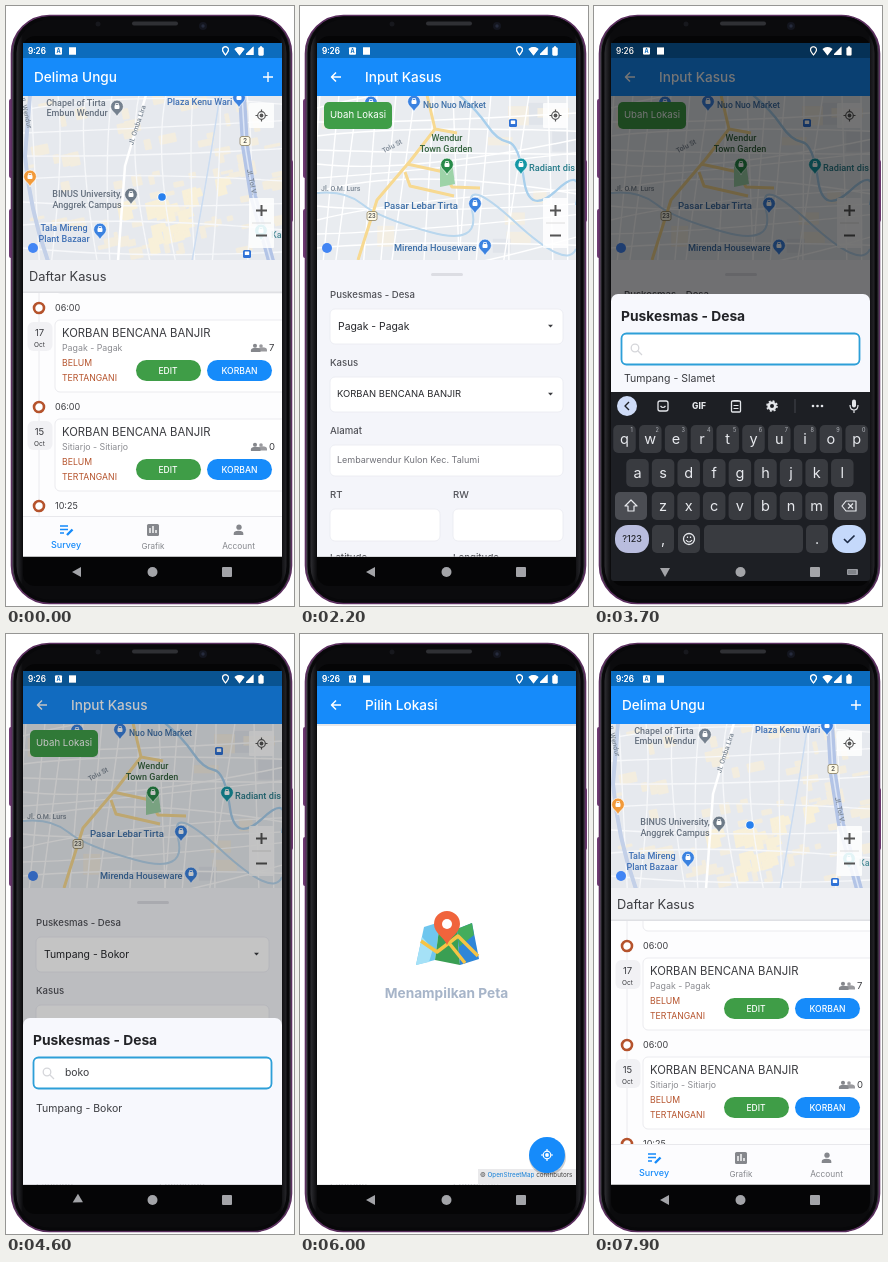
An HTML page that plays this animation: 288x600 px, repeating every 8000 ms.

```html
<!DOCTYPE html>
<html lang="id">
<head>
<meta charset="utf-8">
<title>Survey app demo</title>
<style>
html, body { margin: 0; width: 100%; height: 100%; overflow: hidden; background: #fff; }
svg { display: block; width: 288px; height: 600px; font-family: Inter, "Open Sans", sans-serif; }
.map text { font-family: Roboto, Inter, sans-serif; font-weight: 500; }
</style>
</head>
<body>
<svg id="stage" viewBox="0 0 288 600"></svg>
<script>
const BLUE = '#168bfa', GREEN = '#3f9d47', RUST = '#b5532c', GREY = '#85878c', INK = '#3b3c40';

// drawing helpers
const rect = (x, y, w, h, fill, r = 0, extra = '') =>
  `<rect x="${x}" y="${y}" width="${w}" height="${h}" rx="${r}" fill="${fill}" ${extra}/>`;
const circle = (x, y, r, fill, extra = '') => `<circle cx="${x}" cy="${y}" r="${r}" fill="${fill}" ${extra}/>`;
const line = (d, color, w = 1, extra = '') =>
  `<path d="${d}" fill="none" stroke="${color}" stroke-width="${w}" stroke-linejoin="round" ${extra}/>`;
const shape = (d, fill, extra = '') => `<path d="${d}" fill="${fill}" ${extra}/>`;
const at = (x, y, body) => `<g transform="translate(${x} ${y})">${body}</g>`;
const group = (id, body, extra = '') => `<g id="${id}" ${extra}>${body}</g>`;
// y is the vertical middle of the capitals
const text = (x, y, s, size, fill = INK, weight = 400, anchor = 'start', extra = '') =>
  `<text x="${x}" y="${y + size * 0.36}" font-size="${size}" fill="${fill}" font-weight="${weight}" text-anchor="${anchor}" ${extra}>${s}</text>`;
const mid = (x, y, s, size, fill, weight) => text(x, y, s, size, fill, weight, 'middle');
const tilted = (x, y, angle, s, size = 7) =>
  text(x, y, s, size, '#7b8794', 400, 'middle', `transform="rotate(${angle} ${x} ${y})"`);

let seed = 11;
const rnd = (a, b) => {
  seed = (seed * 16807) % 2147483647;
  return a + (b - a) * seed / 2147483647;
};

// icons
const arrow = (x, y) => line(`M${x + 5} ${y}H${x - 4.5}m4.5 -4.5l-4.5 4.5l4.5 4.5`, '#fff', 1.5);
const target = (x, y, c) => circle(x, y, 3.8, 'none', `stroke="${c}" stroke-width="1.2"`) + circle(x, y, 1.9, c) +
  line(`M${x} ${y - 6}v2.4m0 7.2v2.4M${x - 6} ${y}h2.4m7.2 0h2.4`, c, 1.2);
const pin = (x, y, c) => at(x, y,
  shape('M0 9C-1 5 -6.4 3 -6.4 -1.5A6.4 6.4 0 0 1 6.4 -1.5C6.4 3 1 5 0 9Z', c, 'stroke="#fff" stroke-width=".7"') +
  rect(-2.5, -3, 5, 4, '#fff', 1) + line('M-1.4 -3v-1.5h2.8v1.5', '#fff', .8));
const person = (x, y, s, c) => circle(x, y - 2.6 * s, 2.4 * s, c) +
  shape(`M${x - 4.8 * s} ${y + 4.6 * s}v-1.4q0 -2.8 4.8 -2.8t4.8 2.8v1.4z`, c);
const zoomBox = rect(243, 97, 25, 25, '#fff', 1, 'opacity=".85"') + target(255.5, 109.5, '#555') +
  rect(243, 192, 25, 50, '#fff', 1, 'opacity=".85"') + line('M246 217h19', '#ddd') +
  line('M250 204.500h11m-5.500 -5.500v11M250 229.500h11', '#555', 2);
const transit = (x, y) => rect(x - 4, y - 4, 8, 8, '#2f72d6', 1.5) + rect(x - 2.2, y - 2.5, 4.4, 3.4, '#fff', .5);
const badge = (x, y, s) => rect(x - 5, y - 4.500, 10, 9, '#fffbe8', 2, 'stroke="#80724b" stroke-width=".7"') + mid(x, y, s, 6.5, '#555');

const bar = (title, x) => rect(17, 37, 259, 53, BLUE) + rect(17, 37, 259, 15, '#0c6cbd') + text(x, 71, title, 13.6, '#fff', 500);
const status = () => text(22, 45, '9:26', 8.4, '#fff') + rect(49, 41.500, 7, 7, '#fff', 1) + mid(52.5, 45, 'A', 5.5, '#0c6cbd', 700) +
  rect(63, 41.500, 7, 7, '#fff') +
  line('M219.500 49q-3 -3.500 -3 -5.200a3 3 0 0 1 6 0q0 1.700 -3 5.200z', '#fff', 1.1) +
  shape('M228.500 43q5 -4 10 0l-5 6.500z M240 49v-1l7.500 -7.500v8.500z', '#fff') +
  rect(252.500, 41.500, 5, 8, '#fff', 1) + rect(254, 40.500, 2, 2, '#fff');

// home map
function homeMap() {
  let s = rect(17, 89, 259, 166, '#e6e9ee');
  for (let i = 0; i < 75; i++) {
    const x = rnd(20, 268), y = rnd(90, 246), w = rnd(4, 18), h = rnd(3, 14);
    s += rect(x, y, w, h, '#f3eddf', 1, `transform="rotate(-12 ${x} ${y})"`);
  }
  for (let i = 0; i < 14; i++) {
    const x = rnd(100, 215), y = rnd(165, 235);
    s += shape(`M${x} ${y}l14 -4l3 8l-6 2l2 8l-10 3z`, '#f8f0d9');
  }
  for (let i = 0; i < 9; i++) s += line(`M${25 + i * 27} 89q${rnd(-14, 10)} 60 ${rnd(-8, 14)} 166`, '#f7f8fa', 1.3);
  for (let i = 0; i < 7; i++) s += line(`M17 ${104 + i * 23}q110 ${rnd(-22, 12)} 259 ${rnd(-14, 10)}`, '#f7f8fa', 1.3);
  s += line('M24 89L19 150Q24 205 42 255', '#c3d0e8', 4) + line('M140 89L119 160L112 255', '#fff', 2.5);
  s += line('M236 89L239 140L247 190L265 255', '#b3c4e6', 8) + line('M236 89L239 140L247 190L265 255', '#dde6f6', 1.5);
  s += line('M214 89Q205 150 186 255', '#cbdcf1', 1.5);
  s += tilted(20, 106, 76, 'Jl. Wendur') + tilted(131, 119, -72, 'Jl. Omba Lira') + tilted(246, 176, 78, 'Jl. Tol V.');
  s += badge(239, 135, '2') + transit(241, 248);
  s += mid(70, 97, 'Chapel of Tirta', 9, '#66717f') + mid(71, 107, 'Embun Wendur', 9, '#66717f') + pin(111, 102, '#75818f');
  s += text(161, 96, 'Plaza Kenu Wari', 9, '#4071b5') + pin(233, 93, '#3b82e0');
  s += mid(81, 188, 'BINUS University,', 9, '#66717f') + mid(81, 199, 'Anggrek Campus', 9, '#66717f') + pin(125, 190, '#6d7a88');
  s += mid(58, 222, 'Tala Mireng', 9, '#4071b5') + mid(58, 233, 'Plant Bazaar', 9, '#4071b5') + pin(94, 225, '#3b82e0');
  s += pin(24, 172, '#f29a3a') + pin(255, 226, '#45b6c4') + text(265, 229, 'Ka', 9, '#4f8f99');
  s += circle(156, 191, 4.6, '#fff') + circle(156, 191, 3.8, '#2880ee') + circle(27, 242, 5, '#4285f4');
  return group('homeMap', s + zoomBox, 'class="map" clip-path="url(#mapClip)"');
}

function formMap() {
  let s = rect(17, 89, 259, 166, '#e9ecf0');
  for (let i = 0; i < 12; i++) s += rect(rnd(20, 255), rnd(90, 235), rnd(12, 32), rnd(8, 24), i % 3 ? '#f3eee3' : '#e0e4ea');
  for (let i = 0; i < 14; i++) s += line(`M17 ${88 + i * 14}q90 ${rnd(-28, 12)} 259 ${rnd(-40, 18)}`, '#fff', 1.4);
  for (let i = 0; i < 15; i++) s += line(`M${20 + i * 19} 89l${rnd(-28, 10)} 166`, '#fff', 1.4);
  s += line('M17 187Q45 184 62 198T130 226T172 204T215 216T276 243', '#b9d7ee', 2);
  s += line('M159 89Q177 104 187 119T208 136T224 174T257 184T276 199', '#a8cfec', 2.3);
  s += line('M127 89L135 123L111 154L77 194L58 254M107 158L144 166L152 181L180 182M105 166L110 180L154 190M135 123L157 127', '#f7d991', 3);
  s += shape('M140 158L152 156L155 178L140 181Z', '#9dd3a8');
  s += tilted(92, 140, -28, 'Tolu St') + text(21, 182, 'Jl. O.M. Lurs', 7, '#7b8794', 400) + badge(72, 210, '23') + transit(213, 117);
  s += pin(71, 98, '#3b82e0') + pin(114, 97, '#3b82e0') + text(123, 99, 'Nuo Nuo Market', 8.6, '#3e70a8');
  s += mid(147, 132, 'Wendur', 9, '#35643f') + mid(146, 143, 'Town Garden', 9, '#35643f') + pin(147, 160, '#278a49');
  s += pin(221, 160, '#1597a5') + text(229, 162, 'Radiant dis', 9.2, '#287c8a');
  s += text(84, 200, 'Pasar Lebar Tirta', 9.6, '#3e70a8') + pin(175, 199, '#3b82e0');
  s += text(94, 242, 'Mirenda Houseware', 9.2, '#3e70a8') + pin(185, 241, '#3b82e0');
  return group('formMap', s + circle(27, 242, 5, '#4285f4') + zoomBox, 'class="map" clip-path="url(#mapClip)"');
}

// one entry of the timeline, y = 0 at its dot
const entry = (i, time, day, place, count) => at(0, 302 + i * 99,
  line('M33 0v99', '#eaeaee') +
  circle(33, 0, 5, '#fff', `stroke="${RUST}" stroke-width="2.6"`) + text(49, 0, time, 9) +
  rect(49, 12, 240, 72, '#fff', 5, 'stroke="#ebebef"') +
  rect(21.500, 14, 25, 29, '#f1f1f4', 6) + mid(33.5, 24.500, day, 9.5, INK) + mid(33.5, 37, 'Oct', 6.5, INK) +
  text(56, 24.500, 'KORBAN BENCANA BANJIR', 11.3) + text(56, 40, place, 8.8, '#8b8c91') +
  person(255, 40, .75, '#9a9a9e') + person(249, 40, .85, GREY) + text(263, 40, count, 9.5) +
  text(56, 55, 'BELUM', 8.7, RUST) + text(56, 70, 'TERTANGANI', 8.7, RUST) +
  rect(130, 52, 65, 21, GREEN, 10.5) + mid(162, 62.500, 'EDIT', 8.5, '#fff', 500) +
  rect(201, 52, 65, 21, BLUE, 10.5) + mid(233.5, 62.500, 'KORBAN', 8.6, '#fff', 500));

const home = group('home',
  rect(17, 37, 259, 514, '#fdfdfe') +
  `<g clip-path="url(#listClip)">${group('list',
    entry(-1, '06:00', '18', 'Pagak - Pagak', 2) + entry(0, '06:00', '17', 'Pagak - Pagak', 7) +
    entry(1, '06:00', '15', 'Sitiarjo - Sitiarjo', 0) + entry(2, '10:25', '14', 'Pagak - Pagak', 1))}</g>` +
  homeMap() + rect(17, 254, 259, 32, '#f0f1f4') + rect(17, 285.500, 259, 1.5, '#dfe0e4') +
  text(23, 270, 'Daftar Kasus', 12.8) +
  bar('Delima Ungu', 28) + line('M257 71h10m-5 -5v10', '#fff', 1.4) +
  rect(17, 511, 259, 40, '#fcfcfe') + rect(17, 510, 259, 1, '#e8e8ec') +
  line('M54 520h8m-8 3.500h8m-8 3.500h4', BLUE, 1.5) + line('M61 529l5.500 -5.500', BLUE, 2.4) +
  rect(141, 518, 12, 12, GREY, 1.5) + line('M144 527v-5m3 5v-7m3 7v-3', '#fff', 1.4) + person(233, 524, 1.1, GREY) +
  mid(60, 539, 'Survey', 9, BLUE, 500) + mid(147, 540, 'Grafik', 8.1, GREY) + mid(232.5, 540, 'Account', 8.3, GREY));

const label = (x, y, s) => text(x, y, s, 9.6, '#505157', 500);
const field = (x, y, w, h) => rect(x, y, w, h, '#fff', 5, 'stroke="#e9eaf0" stroke-width=".8"');
const caret = y => shape(`M248 ${y - 1.2}h5l-2.500 2.800z`, INK);
const form = group('form',
  rect(17, 37, 259, 514, '#f4f5fa') + formMap() + bar('Input Kasus', 65) + arrow(36, 71) +
  rect(24, 96, 68, 27, GREEN, 5) + mid(58, 109, 'Ubah Lokasi', 9.6, '#fff') +
  rect(131, 267, 32, 3, '#dcdde3', 1.5) +
  label(30, 289, 'Puskesmas - Desa') + field(30, 303, 233, 35) + text(38, 320, 'Pagak - Pagak', 10.4, '#26272b', 400, 'start', 'id="village"') + caret(320) +
  label(30, 357, 'Kasus') + field(30, 371, 233, 35) + text(37, 388, 'KORBAN BENCANA BANJIR', 9.45, '#26272b') + caret(388) +
  label(30, 425, 'Alamat') + field(30, 439, 233, 31) + text(37, 454, 'Lembarwendur Kulon Kec. Talumi', 9, '#707178') +
  label(30, 489, 'RT') + label(153, 489, 'RW') + field(30, 503, 110, 32) + field(153, 503, 110, 32) +
  label(30, 552, 'Latitude') + label(153, 552, 'Longitude'));

const sheet = group('sheet',
  rect(17, 0, 259, 300, '#f7f8fd', 7) + text(27, 22, 'Puskesmas - Desa', 13.8, '#222327', 700) +
  rect(27.500, 39.500, 238, 31, '#fff', 5, 'stroke="#2d9fd8" stroke-width="1.8"') +
  circle(41, 54, 3.8, 'none', 'stroke="#d5d6da" stroke-width="1.3"') + line('M44 57l4 4', '#d5d6da', 1.3) +
  text(59, 54.500, '', 10.4, INK, 400, 'start', 'id="query"') + text(30, 0, '', 10.5, INK, 400, 'start', 'id="option"'));

// keyboard, y = 0 at its top edge
const key = (x, y, w, s, fill = '#393b40') => rect(x - w / 2, y - 14, w, 28, fill, 5) + mid(x, y, s, 14.5, '#e8eaee');
function keyboard() {
  let s = rect(17, 0, 259, 190, '#1d1f24');
  s += circle(33, 14, 10, '#cfdcf8') + line('M35 10l-4 4l4 4', '#1d1f24', 1.4);
  s += rect(64, 9, 10, 10, 'none', 2, 'stroke="#e4e6ea" stroke-width="1.3"') + line('M66.500 14q2.500 3 5 0', '#e4e6ea', 1.2);
  s += mid(105, 14, 'GIF', 8.5, '#e4e6ea', 800);
  s += rect(137.500, 9, 9, 11, 'none', 1, 'stroke="#e4e6ea" stroke-width="1.3"') + line('M139.500 8.500h5m-5 5h5m-5 3h5', '#e4e6ea', 1.2);
  s += circle(178, 14, 3.3, 'none', 'stroke="#e4e6ea" stroke-width="2.6"') + circle(178, 14, 5, 'none', 'stroke="#e4e6ea" stroke-width="1.6" stroke-dasharray="2 1.93"');
  s += line('M201 7v14', '#44464c') + [219, 223.500, 228].map(x => circle(x, 14, 1.3, '#e4e6ea')).join('');
  s += rect(258, 7.500, 4, 8, '#e4e6ea', 2) + line('M256 13q0 5 4 5t4 -5M260 18v3', '#e4e6ea', 1.2);
  [...'qwertyuiop'].forEach((c, i) => {
    const x = 30.500 + i * 25.8;
    s += key(x, 47, 22.500, c) + mid(x + 7, 38, (i + 1) % 10, 5.5, '#b4b7bd');
  });
  [...'asdfghjkl'].forEach((c, i) => s += key(43.500 + i * 25.6, 81, 22.500, c));
  [...'zxcvbnm'].forEach((c, i) => s += key(69 + i * 25.6, 114, 22.500, c));
  s += key(37, 114, 32, '', '#4b4d53') + line('M37 108l-6 6h3v5h6v-5h3z', '#e8eaee', 1.2);
  s += key(256, 114, 32, '', '#4b4d53') + line('M248 114l4 -5h10v10h-10zm6 -2.500l5 5m0 -5l-5 5', '#e8eaee', 1.2);
  s += rect(21, 133, 34, 28, '#b9bdde', 13) + mid(38, 147, '?123', 9, '#24262d', 500);
  s += key(69, 147, 22, ',') + key(95, 147, 22, '') + circle(95, 147, 5.5, 'none', 'stroke="#e8eaee" stroke-width="1.3"') +
    line('M92 148q3 4 6 0m-4.500 -3.500v1.500m3 -1.500v1.500', '#e8eaee', 1.2);
  s += key(159.5, 147, 99, '') + key(223, 147, 22, '.');
  s += rect(238, 133, 34, 28, '#c5d9fb', 14) + line('M250 147l3.500 3.500l7 -7', '#1d2b45', 1.6);
  s += rect(253, 177, 11, 6, '#9a9ca2', 1) + line('M254.500 179h8m-8 2h8', '#1d1f24', .8, 'stroke-dasharray="1 1"');
  return group('keys', s);
}

const pick = group('pick',
  rect(17, 37, 259, 514, '#fff') + rect(17, 90, 259, 2, '#e6e7ea') + bar('Pilih Lokasi', 65) + arrow(36, 71) +
  shape('M124 293L140 288L135 326L116 331Z', '#6fc6ee') + shape('M140 288L157 295L160 331L135 326Z', '#3a9f53') +
  shape('M157 295L172 289L179 325L160 331Z', '#2f86d8') + shape('M122 303L133 315L129 328L116 331Z', '#a5e1f7') +
  shape('M172 289L174 301L159 313L157 295Z', '#43ad5c') +
  line('M121 307L137 318L158 302L178 322M149 309L165 329', '#f6c445', 3.5) +
  shape('M147 311C144 303 134 299 134 290A13 13 0 0 1 160 290C160 299 150 303 147 311Z', '#f0643c') + circle(147, 290, 5, '#fff') +
  mid(146.5, 359, 'Menampilkan Peta', 13.7, '#a7b5c9', 700) +
  rect(178, 535, 98, 16, '#e9e9eb') +
  text(180, 541, '© <tspan fill="#1680d8">OpenStreetMap</tspan> contributors', 6.3, '#444') +
  circle(247.5, 523, 18.500, '#000', 'opacity=".18"') + circle(247, 521, 18, BLUE) + target(247, 521, '#fff'));

const NAV = '#a3a4a8';
const phone =
  rect(3, 93, 5, 79, '#6f3a73', 2) + rect(3, 203, 5, 49, '#6f3a73', 2) + rect(282, 154, 5, 62, '#6f3a73', 2) +
  rect(5.500, 9.500, 280, 588, 'url(#edge)', 38, 'stroke="#5b2f5f" stroke-width="1.6"') +
  rect(9, 12, 273, 583, 'none', 35, 'stroke="#08080a" stroke-width="3"') +
  rect(17, 30, 259, 550, '#050506', 12) + rect(126, 15.500, 46, 4, '#2f3034', 2) +
  circle(92, 18, 2.5, '#17181d') + circle(197, 20, 4, '#14161f') + circle(197, 20, 1.7, '#262b3d');

document.getElementById('stage').innerHTML =
  `<defs><linearGradient id="edge"><stop offset="0" stop-color="#4a4a50"/><stop offset=".04" stop-color="#0b0b0d"/>
  <stop offset=".96" stop-color="#0b0b0d"/><stop offset="1" stop-color="#3a3a40"/></linearGradient>
  <clipPath id="mapClip">${rect(17, 89, 259, 165, '#000')}</clipPath>
  <clipPath id="listClip">${rect(17, 286, 259, 225, '#000')}</clipPath>
  <clipPath id="pageClip">${rect(17, 37, 259, 513.500, '#000')}</clipPath>
  <clipPath id="screenClip">${rect(17, 37, 259, 538, '#000', 3)}</clipPath></defs>` +
  phone +
  `<g clip-path="url(#pageClip)">${home}${form}${pick}${status()}${group('dim', rect(17, 37, 259, 514, '#000'))}${status()}${sheet}</g>` +
  `<g clip-path="url(#screenClip)">${keyboard()}</g>` +
  group('back', shape('M66 566L75 561V571Z', NAV)) + circle(146.5, 566, 5, NAV) + rect(216, 561, 10, 10, NAV, 1);

// motion: [time, value] steps, linear between them
function track(t, steps) {
  if (t <= steps[0][0]) return steps[0][1];
  for (let i = 1; i < steps.length; i++) {
    const [a, from] = steps[i - 1], [b, to] = steps[i];
    if (t < b) return from + (to - from) * (t - a) / (b - a);
  }
  return steps[steps.length - 1][1];
}
const LOOP = 8000, STEP = 100;
const formFade = [[1800, 0], [2000, .6], [2200, 1], [7400, 1], [7700, 0]];
const pickFade = [[5500, 0], [5700, .6], [5900, 1], [7000, 1], [7300, 0]];
const dimFade = [[2500, 0], [2800, .54], [4300, .54], [4600, .23], [4900, 0]];
const sheetTop = [[2500, 552], [2800, 384], [3000, 384], [3300, 288], [4300, 288], [4500, 384], [4600, 384], [4900, 552]];
const keysTop = [[3000, 576], [3300, 386], [4300, 386], [4500, 576]];
const backTurn = [[3000, 0], [3300, -90], [4400, -90], [4700, 0]];

const el = id => document.getElementById(id);
const move = (id, y) => el(id).setAttribute('transform', `translate(0 ${y})`);
const fade = (id, v) => el(id).setAttribute('opacity', v);

function draw(t) {
  const glide = 1 - Math.min(t / 900, 1);
  move('list', t < 3000 ? 12 * (1 - glide * glide) : 10);
  fade('form', track(t, formFade));
  fade('pick', track(t, pickFade));
  fade('dim', track(t, dimFade));
  move('sheet', track(t, sheetTop));
  move('keys', track(t, keysTop));
  el('back').setAttribute('transform', `rotate(${track(t, backTurn)} 71 566)`);
  const typed = Math.max(0, Math.min(4, (t - 3700) / STEP));
  el('query').textContent = 'boko'.slice(0, typed);
  el('option').textContent = typed ? 'Tumpang - Bokor' : 'Tumpang - Slamet';
  el('option').setAttribute('y', t < 4400 ? 87.800 : 93.800);
  el('village').textContent = t < 4400 ? 'Pagak - Pagak' : 'Tumpang - Bokor';
}

const start = performance.now();
function tick() {
  const t = (performance.now() - start) % LOOP;
  draw(Math.floor(t / STEP) * STEP);
  requestAnimationFrame(tick);
}
tick();
</script>
</body>
</html>
```
